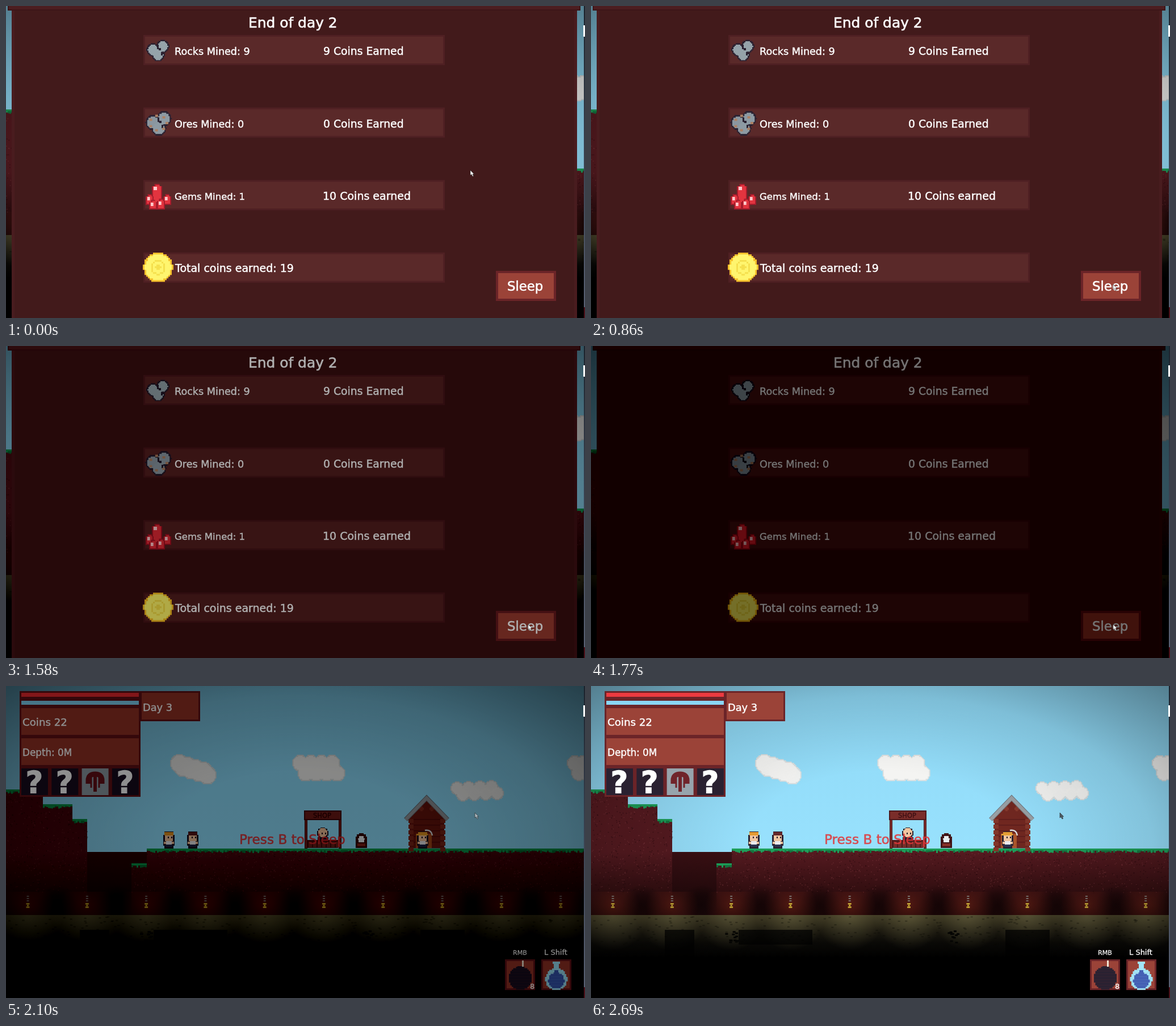
These frames come from a looping animation (1020 by 549 pixels, 2760 ms). An HTML page with a canvas:

```html
<!DOCTYPE html>
<html>
<head>
<meta charset="utf-8">
<style>
  html, body { margin: 0; width: 100%; height: 100%; overflow: hidden; background: #000; }
  canvas, svg { position: absolute; left: 0; top: 0; }
</style>
</head>
<body>
<div id="game"></div>
<svg width="1020" height="549">
  <defs>
    <linearGradient id="edge" x2="0" y2="1">
      <stop stop-color="#1c232d"/><stop offset="1" stop-color="#596173"/>
    </linearGradient>
  </defs>
  <rect x="1018" width="2" height="530" fill="url(#edge)"/>
  <rect x="1018" y="530" width="2" height="19" fill="#4a1018"/>
  <rect x="1017" y="34" width="3" height="20" fill="#fff"/>
  <path id="cursor" d="M0 0V9L2 7.2L4 11L5.6 10.2L4 6.8H6.6Z" stroke="#222" stroke-width=".6"/>
</svg>
<script>
const W = 1020, H = 549, LOOP = 2760, CUT = 1900;
const DARK = '#2a2131', FRAME = '#6b2428', PANEL = '#9b4338', WHITE = '#fff', SKIN = '#f0c5a0';
const game = document.getElementById('game');
const cursor = document.getElementById('cursor');
let ctx;

let seed = 7;
const rnd = () => (seed = (seed * 16807) % 2147483647) / 2147483647;

function layer() {
  const c = document.createElement('canvas');
  c.width = W;
  c.height = H;
  game.append(c);
  ctx = c.getContext('2d');
  return c;
}

function rect(color, x, y, w, h) {
  ctx.fillStyle = color;
  ctx.fillRect(x, y, w, h);
}

function box(x, y, w, h, edge, fill, b = 3) {
  rect(edge, x, y, w, h);
  rect(fill, x + b, y + b, w - 2 * b, h - 2 * b);
}

// Disc built from square cells of size p
function disc(color, x, y, r, p = 2) {
  for (let v = -r; v < r; v += p) {
    const c = v + p / 2;
    const half = Math.round(Math.sqrt(Math.max(0, r * r - c * c)) / p) * p;
    rect(color, x - half, y + v, 2 * half, p + .3);
  }
}

function curve(color, width, path) {
  ctx.strokeStyle = color;
  ctx.lineWidth = width;
  ctx.stroke(new Path2D(path));
}

function text(str, x, y, size, color = WHITE, weight = '') {
  ctx.font = `${weight} ${size}px "DejaVu Sans", sans-serif`;
  ctx.fillStyle = ctx.strokeStyle = color;
  ctx.lineWidth = size / 40;
  ctx.fillText(str, x, y);
  ctx.strokeText(str, x, y);
}

function stops(g, colors) {
  colors.forEach((c, i) => g.addColorStop(i / (colors.length - 1), c));
  return g;
}
const fade = (y0, y1, ...colors) => stops(ctx.createLinearGradient(0, y0, 0, y1), colors);
const glow = (x, y, r0, r, ...colors) => stops(ctx.createRadialGradient(x, y, r0, x, y, r), colors);

// Puffs spread over a box; tilt lowers the right end
function cloud(x, y, w, h, tilt = 0) {
  const r = h * .3;
  for (const [color, grow] of [['#dcdfdf', 1], ['#f4f4f2', -1]])
    for (let i = 0; i < 8; i++) {
      const u = i / 7;
      const spread = (h / 2 - r) * ((1 - Math.abs(tilt)) * (i % 2 ? 1 : -1) + tilt * (2 * u - 1));
      disc(color, x + r + (w - 2 * r) * u, y + h / 2 + spread, r + grow);
    }
}

function person(x, hair) {
  rect(DARK, x - 8, 256, 16, 30);
  rect(DARK, x - 10, 262, 20, 19);
  rect(SKIN, x - 7, 261, 14, 12);
  rect(hair, x - 8, 257, 16, 6);
  for (const eye of [-2, 4]) rect(DARK, x + eye, 265, 2, 3);
  rect(SKIN, x - 9, 274, 18, 4);
  rect('#e9e9ee', x - 5, 273, 10, 6);
  rect('#2d3350', x - 6, 279, 12, 4);
}

function grass(x0, x1, y) {
  rect('#1d9f59', x0, y, x1 - x0, 4);
  for (let x = x0; x < x1; x += 3)
    rect(rnd() < .5 ? '#1d9f59' : '#14753f', x, y + 3, Math.min(3, x1 - x), rnd() * 5);
}

function drawGround() {
  const soil = fade(182, 403, '#561a20', '#561a20', '#551a20', '#381013', '#200808');
  rect(fade(292, 370, '#3a1014', '#22090b'), 143, 292, 105, 111);
  for (const [x0, x1, y] of [[0, 65, 182], [65, 117, 208], [117, 143, 234], [221, 248, 312], [248, W, 286]]) {
    rect(soil, x0, y, x1 - x0, 403 - y);
    const dots = (x1 - x0) * (365 - y) / 55;
    for (let i = 0; i < dots; i++)
      rect(rnd() < .5 ? 'rgba(165,85,90,.3)' : 'rgba(25,4,8,.45)',
        x0 + rnd() * (x1 - x0), y + 8 + rnd() * (355 - y), 1.5, 1.5);
    grass(x0, x1, y);
  }
}

function drawMine() {
  rect('#000', 0, 403, W, H - 403);
  rect(fade(403, 478, '#39341f', '#1d1a10', '#0a0906', '#000'), 0, 403, W, 75);
  for (let x = 38.5; x < W; x += 104.3) {
    rect(glow(x + 52, 385, 0, 36, 'rgba(8,1,2,.6)', 'rgba(8,1,2,.4)', 'rgba(8,1,2,0)'), x + 16, 349, 72, 54);
    rect(glow(x, 385, 0, 46, 'rgba(120,38,24,.5)', 'rgba(110,34,22,.25)', 'rgba(110,34,22,0)'), x - 46, 362, 92, 41);
    for (let i = 0; i < 3; i++) {
      rect('#77706c', x - 2, 369 + 4 * i, 4, 2);
      rect('#c9ac36', x - (i === 1 ? 1.5 : 3), 382 + 3 * i, i === 1 ? 3 : 6, 2.5);
    }
    rect(glow(x, 403, 0, 62, 'rgba(125,118,78,.5)', 'rgba(125,118,78,0)'), x - 62, 403, 124, 62);
  }
  for (let i = 0; i < 260; i++)
    rect('rgba(10,9,4,.35)', rnd() * W, 405 + rnd() * 50, 4, 2);
  for (const [x, w] of [[130, 52], [260, 130], [730, 78]])
    rect('rgba(0,0,0,.72)', x, 429, w, w > 100 ? 26 : 60);
  for (let i = 0; i < 24; i++)
    rect('#050503', (i % 2 ? 627 : 236) + rnd() * 20, 430 + rnd() * 22, 5, 3);
}

function drawShop() {
  for (const x of [526, 586]) box(x, 230, 5, 56, '#4d181b', '#7a2d2a', 1);
  box(525, 219, 66, 17, '#4d181b', '#7a2d2a', 2);
  text('SHOP', 541, 231.5, 11.5, '#3b1014');
  disc(DARK, 558, 259, 10);
  disc(SKIN, 558, 258, 8);
  for (const x of [556, 562]) rect(DARK, x, 258, 2, 3);
  rect(DARK, 549, 266, 19, 7);
  rect('#501a1b', 531, 271, 54, 14);
  for (let x = 533; x < 583; x += 8) rect('#74302a', x, 274, 6, 10);

  // Mirror beside the shop
  for (const [color, r, base] of [['#421417', 10, 285], ['#e8eef0', 5, 275]]) {
    disc(color, 626, 269, r);
    rect(color, 626 - r, 269, 2 * r, base - 269);
  }
  rect('#873028', 619, 277, 14, 5);
}

function drawHouse() {
  ctx.fillStyle = '#702720';
  ctx.fill(new Path2D('M711 231L741 199L772 231V285H711Z'));
  for (let y = 234; y < 285; y += 10) {
    rect('#5a1c1b', 718, y, 47, 1.5);
    for (const x of [709, 765]) rect('#82362a', x, y, 9, 7);
  }
  for (const x of [732, 750]) disc('#85382c', x, 216, 4);
  curve('#70767d', 8, 'M704 235L741 197L778 235');
  curve('#999fa4', 6, 'M704 235L741 197L778 235');
  rect('#a9542a', 722, 260, 28, 25);
  person(734, '#e39a32');
  rect('#e3a036', 723, 260, 20, 3);
  curve('#d8dde0', 2.5, 'M738 254Q749 252 751 263');
}

function drawWorld() {
  rect(fade(0, 290, '#8fd9f6', '#98e1fd'), 0, 0, W, 300);
  cloud(290, 121, 80, 51, .75);
  cloud(505, 122, 92, 45);
  cloud(784, 166, 92, 36, -.2);
  cloud(989, 123, 78, 43);
  drawGround();
  drawMine();
  drawShop();
  drawHouse();
  person(287, '#e39a32');
  person(329, '#64282a');

  ctx.save();
  ctx.scale(W / 2, H / 2);
  rect(glow(1, 1, .45, 1.42, 'rgba(0,0,0,0)', 'rgba(0,0,0,.13)', 'rgba(0,0,0,.42)'), 0, 0, 2, 2);
  ctx.restore();
}

function drawHud() {
  rect(FRAME, 24, 9, 213, 186);
  box(234, 9, 108, 53, FRAME, PANEL);
  rect(FRAME, 234, 9, 5, 53);
  rect('#ec3a40', 27, 12, 207, 7);
  rect('#8ad6f6', 27, 26, 207, 7);
  for (const y of [39, 92]) rect(PANEL, 27, y, 207, 47);
  text('Coins 22', 29, 70, 18.2);
  text('Depth: 0M', 29, 123, 16.8);
  text('Day 3', 241, 44, 17.8);

  for (let i = 0; i < 4; i++) {
    const x = 27 + 53.3 * i;
    rect(i === 2 ? '#97a4ac' : DARK, x, 145, 47, 47);
    if (i !== 2) text('?', x + 7.5, 188, 53, WHITE, 'bold');
  }
  curve('#70242a', 9, 'M145 172V166Q145 155 157 155T169 166V172');
  curve('#70242a', 6, 'M157 153V186');
  curve('#70242a', 3, 'M150 156V179M164 156V179');

  text('Press B to Sleep', 411, 278, 23.2, 'rgba(226,54,56,.85)');

  for (const x of [879, 943]) box(x, 481, 53, 54, FRAME, PANEL);
  disc(DARK, 906, 514, 20, 2.5);
  rect(DARK, 901, 493, 9, 6);
  rect('#f1e5d4', 909, 483, 3, 11);
  rect('#a2e5f8', 963, 485, 13, 4);
  rect('#a2e5f8', 965, 488, 9, 12);
  disc('#a2e5f8', 969.5, 516, 19, 2.5);
  disc('#4460b4', 969.5, 518, 14, 2.5);
  rect('#4460b4', 966, 500, 7, 8);
  text('RMB', 893, 473, 11);
  text('L Shift', 948, 473, 13);
  text('8', 923, 533, 13);
}

// Three lumps with a dark outline and a crack
function rock(x, y, s, fill) {
  const lumps = [[-8, -1], [9, -7], [1, 8]];
  for (const [color, r] of [[DARK, 11.5], [fill, 9]])
    for (const [dx, dy] of lumps) disc(color, x + dx * s, y + dy * s, r * s);
  rect(DARK, x - 1, y - 10, 3, 8);
  rect(DARK, x + 2, y - 4, 4, 4);
  rect(DARK, x + 6, y + 3, 3, 6);
}

function crystal(x, top, w, base) {
  for (const [color, b] of [['#a51c2c', 0], ['#e2343f', 2]]) {
    rect(color, x + b, top + 4, w - 2 * b, base - top - 4 - b);
    rect(color, x + w / 4 + b, top + b, w / 2 - b, 5);
  }
  rect('#ffc9cb', x + 3, top + 5, w / 3, 6);
}

function drawIcons() {
  rock(267, 78, 1, '#95a3aa');
  rock(268, 206, 1.14, '#8d9aa3');
  for (let i = 0; i < 7; i++) {
    const a = i * .9;
    rect('#ad8063', 266 + 15 * Math.cos(a), 204 + 13 * Math.sin(a), 5, 4);
  }
  crystal(257, 313, 18, 352);
  crystal(246, 331, 14, 350);
  crystal(277, 331, 14, 350);
  crystal(252, 341, 14, 358);
  crystal(266, 339, 14, 358);
  for (const [color, r] of [['#f8c22c', 26], ['#fff56e', 23], ['#f5e04e', 13], ['#fff56e', 10], ['#f5e04e', 5]])
    disc(color, 268, 460, r, 3);
}

function drawSummary() {
  rect('#491c1f', 10, 0, 996, H);
  rect('#421a1b', 15, 8, 986, H - 8);
  box(3, -4, 1009, 12, '#3d1518', '#4c1d20', 2);
  for (let i = 0; i < 4; i++) box(242, 51 + 127.6 * i, 531, 53, '#4f2023', '#5a2929');
  box(863, 466, 106, 53, FRAME, PANEL, 4);
  drawIcons();
  text('End of day 2', 427, 38, 24.9);
  text('Rocks Mined: 9', 297, 86, 17.6);
  text('9 Coins Earned', 559, 86, 18.8);
  text('Ores Mined: 0', 297, 214, 17.6);
  text('0 Coins Earned', 559, 214, 18.8);
  text('Gems Mined: 1', 297, 341, 16.5);
  text('10 Coins earned', 558, 341, 19);
  text('Total coins earned: 19', 298, 468, 19);
  text('Sleep', 883, 501, 22.8);
}

const world = layer();
drawWorld();
drawHud();
const summary = layer();
drawWorld();
drawSummary();

const part = (t, t0, t1) => Math.min(1, Math.max(0, (t - t0) / (t1 - t0)));
const ease = u => u * u * (3 - 2 * u);

function frame(now) {
  const t = now % LOOP, morning = t >= CUT;
  const light = morning
    ? 1 - (1 - part(t, CUT + 10, 2560)) ** 2.3
    : 1 - .72 * part(t, 930, CUT) ** 2;
  summary.style.display = morning ? 'none' : 'block';
  game.style.filter = `brightness(${light}) contrast(${1 + .24 * (1 - light)})`;
  const down = ease(part(t, 320, 800)), up = ease(part(t, 1790, 2030));
  cursor.setAttribute('transform',
    `translate(${818 + 102 * down - 94 * up} ${289 + 201 * down - 267 * up})`);
  cursor.setAttribute('fill', t < 2020 ? WHITE : t < 2150 ? '#a9b4ba' : '#4d5a63');
  requestAnimationFrame(frame);
}
requestAnimationFrame(frame);
</script>
</body>
</html>
```
